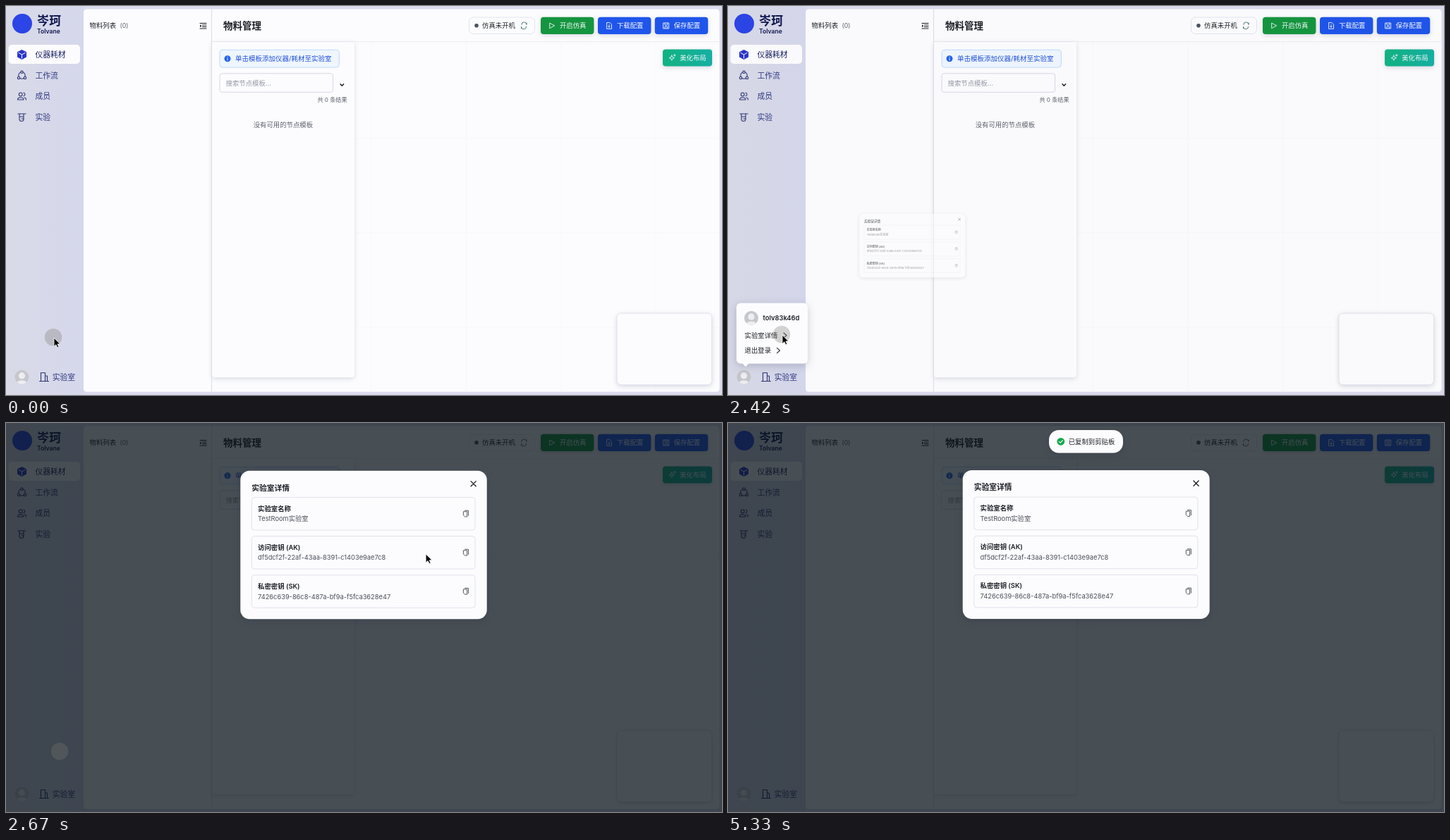
An HTML page for the animation above (6260 ms loop, 1015 by 552 pixels).

```html
<!DOCTYPE html>
<html lang="zh-CN">
<head>
<meta charset="utf-8">
<title>物料管理</title>
<style>
html, body { margin: 0; width: 100%; height: 100%; overflow: hidden; background: #d8d9eb; }
svg { display: block; width: 100%; height: 100%; }
text { font: 9.4px Inter, "Noto Sans CJK SC", "Noto Sans CJK", sans-serif; fill: #1d2027; }
.bold { font-weight: 600; }
.small { font-size: 8.1px; }
.menu { font-size: 10.8px; fill: #303a80; }
.menu.active { fill: #171c60; font-weight: 500; }
.white { fill: #f7faff; font-weight: 500; }
.muted { fill: #5b606c; }
.brand { font-weight: 600; fill: #10184f; }
.line { fill: none; stroke: #2c3575; stroke-width: 1.1; stroke-linecap: round; stroke-linejoin: round; }
.line.light { stroke: #f2f7ff; stroke-width: .9; }
.line.dark { stroke: #1b1d24; }
.card { fill: #fcfcfe; stroke: #e0e2ec; }
.soft { filter: drop-shadow(0 2px 3px rgba(30, 35, 80, .16)); }
.raised { filter: drop-shadow(0 3px 6px rgba(20, 25, 60, .2)); }
</style>
</head>
<body>
<svg viewBox="0 0 1015 552">
  <defs>
    <linearGradient id="side"><stop stop-color="#d9dae7"/><stop offset="1" stop-color="#d5d7ec"/></linearGradient>
    <linearGradient id="teal"><stop stop-color="#12b281"/><stop offset="1" stop-color="#16afa3"/></linearGradient>
    <pattern id="grid" x="517.5" y="52.5" width="134.4" height="134.4" patternUnits="userSpaceOnUse">
      <path d="M.5 0V134.4M0 .5H134.4" stroke="#f7f7fa"/>
    </pattern>
    <clipPath id="round"><circle r="10"/></clipPath>
    <g id="avatar">
      <circle r="10" fill="#c6c7cc"/>
      <g clip-path="url(#round)" fill="#eeeef2"><circle cy="-1.8" r="4.6"/><ellipse cy="9.5" rx="7.4" ry="4.8"/></g>
    </g>
    <path id="copy" d="M-2-4.4H3.4V3.2M-3.7-2.8H1.6V4.4H-1.6L-3.7 2.4Z" fill="none"/>
    <path id="chevron" d="M-2-3.5L2 0L-2 3.5" class="line dark"/>
  </defs>

  <rect width="1015" height="552" fill="#d9dbed"/>
  <rect width="110" height="552" fill="url(#side)"/>
  <rect x="110" y="4.5" width="901.5" height="543" rx="4.5" fill="#fcfcfe"/>

  <!-- sidebar -->
  <circle cx="23" cy="25" r="14" fill="#2b45e6"/>
  <text x="44" y="26.5" class="brand" style="font-size:17px">岑珂</text>
  <text x="44" y="39" class="brand" style="font-size:8.6px">Tolvane</text>
  <rect x="3.5" y="55" width="101.5" height="27" rx="5" fill="#fcfcfe"/>
  <path d="M22.5 62L29 65.3V72.6L22.5 76L16 72.6V65.3Z" fill="#2c35c8"/>
  <path d="M17.5 66.3L22.5 69L27.5 66.3M22.5 69V74.5" fill="none" stroke="#fff"/>
  <g class="line">
    <circle cx="22.5" cy="98.5" r="4.7"/>
    <g fill="#d8d9eb"><circle cx="22.5" cy="93.8" r="1.7"/><circle cx="18" cy="102" r="1.7"/><circle cx="27" cy="102" r="1.7"/></g>
    <circle cx="20.7" cy="125.4" r="2.4"/>
    <path d="M16.5 133Q16.5 129.8 20.7 129.8T24.9 133ZM25 123Q29 125.5 25 127.8M26 130Q28.5 130.5 28.5 133"/>
    <path d="M17 153H28M19 153V161Q19.2 163.5 22 163.5T25 161V153M19 157H25M22 160H25"/>
    <path d="M49.5 532.5V520.5H55.5V532.5M55.5 525H58.5V532.5M47.5 532.5H60.5"/>
  </g>
  <g id="menu"></g>
  <use href="#avatar" x="22.5" y="526.5"/>
  <text x="65.7" y="530.7" class="menu">实验室</text>

  <!-- material list -->
  <text x="118.5" y="31.2" font-weight="500">物料列表</text>
  <text x="161.5" y="31" class="muted" style="font-size:8.8px">(0)</text>
  <path d="M275 24.5H284M278.5 27H284M278.5 29.5H284M275 32H284" class="line dark"/>
  <path d="M275 26.2L277.3 28.2L275 30.2Z" fill="#1b1d24"/>

  <!-- workspace -->
  <rect x="495" y="51" width="516" height="496" fill="url(#grid)"/>
  <path d="M292 50.5H1011" stroke="#ebecf4"/>
  <path d="M292 51H494V523Q494 527 490 527H296Q292 527 292 523Z" fill="#fcfcfe" class="soft"/>
  <path d="M291.5 4.5V547" stroke="#d9dbe8"/>
  <text x="308" y="33" class="bold" style="font-size:13.5px">物料管理</text>
  <rect x="656.5" y="16" width="93" height="23.5" rx="6" fill="#fcfcfe" stroke="#e2e5f2"/>
  <circle cx="667" cy="27.8" r="2.8" fill="#4a5261"/>
  <text x="675" y="31.2">仿真未开机</text>
  <path d="M730.8 26.5A3.6 3.6 0 0 1 738 26.5V24M737.7 29.3A3.6 3.6 0 0 1 730.5 29.3V31.8" class="line" style="stroke:#3f6f74;stroke-width:.9"/>
  <g id="buttons"></g>

  <rect x="303" y="62.3" width="169.3" height="24.7" rx="4" fill="#eff6ff" stroke="#bcdafc"/>
  <circle cx="314" cy="74.8" r="4.5" fill="#2563eb"/>
  <path d="M314 74.2V77.2M314 72.2V72.5" class="line light"/>
  <text x="325" y="78.3" style="font-size:9.5px;fill:#1f4fd8">单击模板添加仪器/耗材至实验室</text>
  <rect x="303" y="95.8" width="160.5" height="26.5" rx="3" fill="#fcfcfe" stroke="#d5d8e6"/>
  <text x="311.5" y="112.8" style="fill:#9699a6">搜索节点模板...</text>
  <path d="M474 110.8L476.3 113.2L478.6 110.8" class="line dark" style="stroke-width:1.5"/>
  <text x="483.5" y="136.3" text-anchor="end" class="small muted">共 0 条结果</text>
  <text x="350.7" y="171.7" class="muted">没有可用的节点模板</text>
  <rect x="866" y="436" width="134.5" height="101.5" rx="6" class="card soft"/>

  <rect id="mask" width="1015" height="552" fill="#0a131a"/>

  <g id="popover">
    <rect x="12" y="421.5" width="101" height="86" rx="6" fill="#fcfcfe" class="raised"/>
    <path d="M20.5 507L25 512L29.5 507Z" fill="#fcfcfe"/>
    <use href="#avatar" x="33" y="442.7"/>
    <text x="49.5" y="446" class="bold">tolv83k46d</text>
    <text x="23.5" y="470.7">实验室详情</text>
    <text x="23.5" y="492.3">退出登录</text>
    <use href="#chevron" x="81" y="467.3"/>
    <use href="#chevron" x="71.5" y="488.8"/>
  </g>

  <g id="modal">
    <rect x="332.7" y="67" width="350" height="211" rx="13" fill="#fcfcfe" class="raised"/>
    <text x="348.7" y="95" class="bold" style="font-size:10.8px">实验室详情</text>
    <path d="M660 82L667.2 89.2M667.2 82L660 89.2" class="line dark" style="stroke-width:1.3"/>
    <g id="fields"></g>
  </g>

  <g id="tooltip">
    <rect x="637" y="147" width="32" height="23" rx="6" fill="#252a3a" class="raised"/>
    <path d="M649 169.5L653 174L657 169.5Z" fill="#252a3a"/>
    <text x="653" y="161.5" text-anchor="middle" class="small white">复制</text>
  </g>

  <g id="toast">
    <rect x="455" y="10" width="105" height="32.5" rx="14" fill="#fcfcfe" class="raised"/>
    <circle cx="471.8" cy="26.3" r="5.4" fill="#14a84b"/>
    <path d="M469.4 26.4L471.2 28.2L474.4 24.7" class="line light" style="stroke-width:1.2"/>
    <text x="482.7" y="29.8">已复制到剪贴板</text>
  </g>

  <circle id="halo" r="12.2" fill="rgba(120,120,112,.32)"/>
  <path id="arrow" d="M0 0V12.2L2.9 9.6L4.8 13.6L6.8 12.7L5 8.8H8.9Z" fill="#000" stroke="#fff" stroke-width=".8"/>
  <path id="hand" d="M-1.2 1.2A1.2 1.2 0 0 1 1.2 1.2V5.3L6 6.4Q7.7 6.8 7.5 8.6L6.6 14H.8L-3.6 9Q-3.4 6.9-1.2 8.4ZM3 8.6V11M5 8.9V11" fill="#fff" stroke="#111" stroke-linejoin="round"/>
</svg>
<script>
const LOOP = 6.26, FPS = 12;
const el = id => document.getElementById(id);
const fill = (id, items, markup) => el(id).innerHTML = items.map(markup).join('');

fill('menu', ['仪器耗材', '工作流', '成员', '实验'], (label, i) =>
  `<text x="41.4" y="${73 + i * 29.6}" class="menu ${i ? '' : 'active'}">${label}</text>`);

// Button icons are drawn around their own centre.
const buttons = [
  { label: '开启仿真', x: 758, y: 15.7, color: '#15953f', icon: 'M-3-3.6L3.6 0L-3 3.6Z' },
  { label: '下载配置', x: 839, y: 15.7, color: '#1f55ea', icon: 'M-3-4.3H1L3.5-1.8V4.5H-3ZM0-1.3V2.4M-1.5.9L0 2.4L1.5.9' },
  { label: '保存配置', x: 919.8, y: 15.7, color: '#1f55ea', icon: 'M-3.8-3.8H3.8V4H-3.8ZM-1.8-3.8V-.8H1.8V-3.8M-1.8 4V1.2H1.8V4' },
  { label: '美化布局', x: 931, y: 61.4, width: 70, color: 'url(#teal)', icon: 'M-.5-3.5L.6-1L3.2 0L.6 1L-.5 3.6L-1.6 1L-4.2 0L-1.6-1ZM3.5-5V-2.4M2.2-3.7H4.8' },
];
fill('buttons', buttons, ({ label, x, y, width = 75.4, color, icon }) => `
  <g transform="translate(${x} ${y})">
    <rect width="${width}" height="24.2" rx="4" fill="${color}" class="soft"/>
    <path d="${icon}" transform="translate(${width / 2 - 21.7} 12.2)" class="line light"/>
    <text x="${width / 2 - 10.8}" y="15.5" class="white">${label}</text>
  </g>`);

const fields = [
  ['实验室名称', 'TestRoom实验室'],
  ['访问密钥 (AK)', 'df5dcf2f-22af-43aa-8391-c1403e9ae7c8'],
  ['私密密钥 (SK)', '7426c639-86c8-487a-bf9a-f5fca3628e47'],
];
fill('fields', fields, ([label, value], i) => `
  <g transform="translate(0 ${i * 55.2})">
    <rect x="348.7" y="105" width="317.3" height="46.5" rx="4" class="card"/>
    <text x="357.5" y="124" class="bold">${label}</text>
    <text x="357.5" y="138.8" style="font-size:9.3px;fill:#4b4f5b">${value}</text>
    <use href="#copy" x="653" y="128" stroke="#555a66"/>
  </g>`);
const copyIcon = document.querySelectorAll('#fields use')[1];

const ramp = (t, from, to) => Math.min(1, Math.max(0, (t - from) / (to - from)));
const smooth = (t, from, to) => { const u = ramp(t, from, to); return u * u * (3 - 2 * u); };
const easeOut = (t, from, to) => 1 - (1 - ramp(t, from, to)) ** 3;
const overshoot = (t, from, to) => { const v = ramp(t, from, to) - 1; return 1 + 3.6 * v ** 3 + 2.6 * v * v; };

const home = { x: 68, y: 471 };
const hops = [
  { from: .32, to: .84, x: 23, y: 527 },      // avatar
  { from: 1.56, to: 2.16, x: 77, y: 467 },    // lab details
  { from: 2.6, to: 2.83, x: 584, y: 192 },    // into the dialog
  { from: 3.09, to: 3.58, x: 653, y: 185 },   // copy icon
  { from: 4.99, to: 5.5, x: 1060, y: -40 },   // off stage
];

function pointer(t) {
  return hops.reduce((p, hop) => {
    if (t <= hop.from) return p;
    const u = overshoot(t, hop.from, hop.to);
    return { x: p.x + (hop.x - p.x) * u, y: p.y + (hop.y - p.y) * u };
  }, home);
}

function place(id, transform, opacity = 1) {
  el(id).setAttribute('transform', transform);
  el(id).setAttribute('opacity', opacity);
}

function zoom(id, x, y, scale, opacity) {
  place(id, `translate(${x} ${y}) scale(${scale}) translate(${-x} ${-y})`, opacity);
}

function draw() {
  const now = performance.now() / 1000 % LOOP;
  const t = Math.floor((now + .004) * FPS) / FPS;

  const popover = smooth(t, 1.17, 1.33) - smooth(t, 2.46, 2.6);
  zoom('popover', 22.5, 512, .8 + .2 * popover, 1 - (1 - popover) ** 2);

  const modal = easeOut(t, 2.382, 2.708);
  zoom('modal', 76, 466, .2 + .8 * modal, Math.sqrt(modal));
  el('mask').setAttribute('opacity', .74 * smooth(t, 2.4, 2.67));

  const tooltip = smooth(t, 3.75, 3.92) - smooth(t, 4.98, 5.1);
  zoom('tooltip', 653, 174, .8 + .2 * tooltip, tooltip);

  const toast = smooth(t, 4, 4.33);
  place('toast', `translate(0 ${34 * (toast - 1)})`, toast);

  const onCopy = t > 3.55 && t < 5;
  const hovering = onCopy || t > .7 && t < 1.65;
  copyIcon.setAttribute('stroke', onCopy ? '#2f6bea' : '#555a66');

  // The halo trails the pointer by one tick.
  const tip = pointer(t), halo = pointer(t - 1 / FPS);
  place('halo', `translate(${halo.x - 1} ${halo.y - 1})`);
  place('arrow', `translate(${tip.x} ${tip.y})`, hovering ? 0 : 1);
  place('hand', `translate(${tip.x} ${tip.y})`, hovering ? 1 : 0);
  requestAnimationFrame(draw);
}
draw();
</script>
</body>
</html>
```
